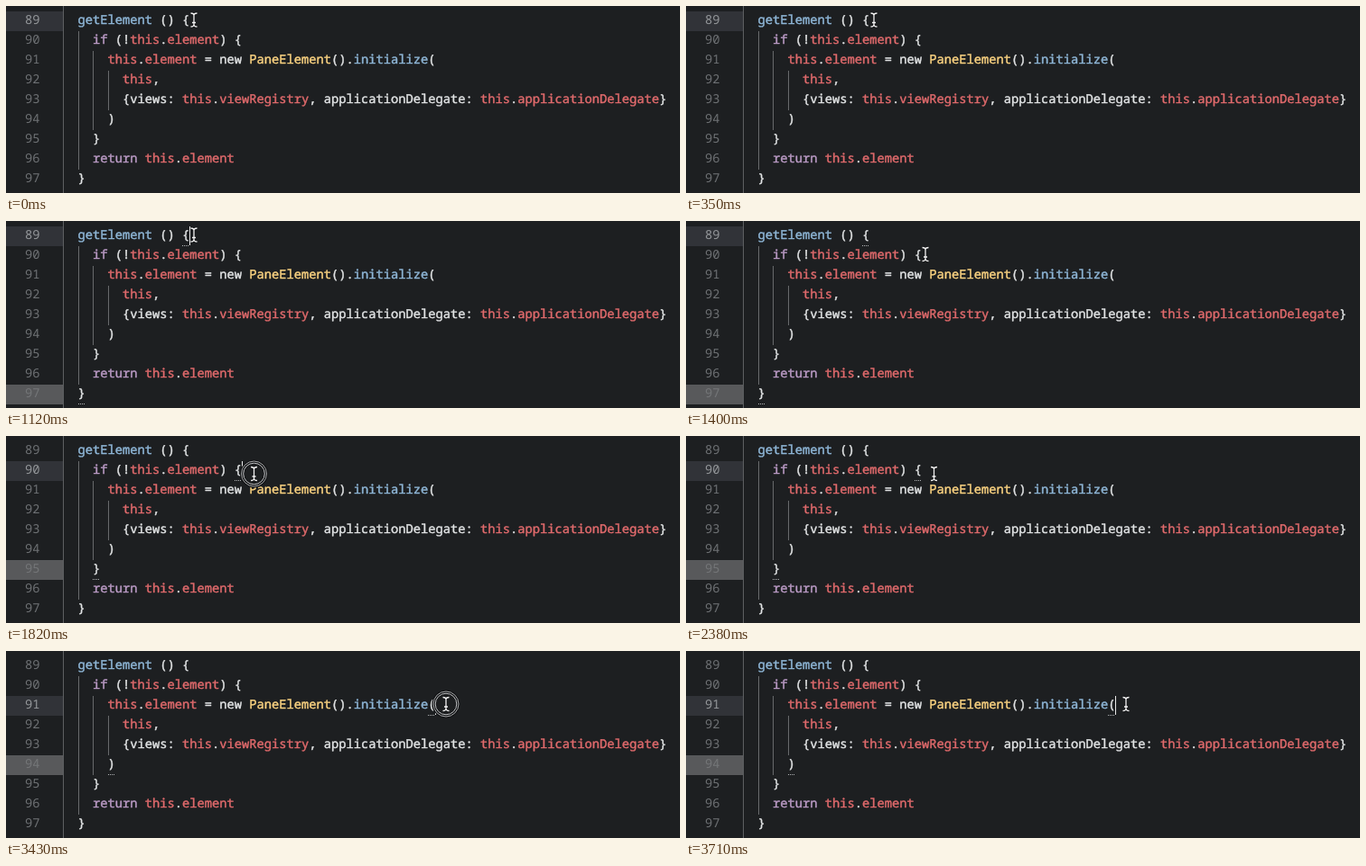
Write an HTML page with a canvas that moves like this. It is 746x208 px and loops after 3.78 s.

```html
<!DOCTYPE html>
<html lang="en">
<head>
<meta charset="utf-8">
<title>Matching brackets</title>
<style>
  html, body { margin: 0; width: 100%; height: 100%; overflow: hidden; background: #1d1f21; }
  canvas { display: block; width: 746px; height: 208px; }
</style>
</head>
<body>
<canvas id="stage" width="746" height="208"></canvas>
<script>
const ctx = document.getElementById('stage').getContext('2d');
const LOOP = 3780, STEP = 70;
const ROW = 22, TOP = 6, BASELINE = 14, LEFT = 79.5, CHAR = 8.25, GUTTER = 63;

const COLORS = {
  w: '#e2e4e5', r: '#e06a6c', b: '#8fb7d8', p: '#bb9bc6', y: '#fbd381'
};

// Each line: indent, then "color:text" tokens separated by |
const LINES = [
  [0, 'b:getElement|w: () {'],
  [2, 'p:if|w: (!|r:this|w:.|r:element|w:) {'],
  [4, 'r:this|w:.|r:element|w: = new |y:PaneElement|w:().|b:initialize|w:('],
  [6, 'r:this|w:,'],
  [6, 'w:{views: |r:this|w:.|r:viewRegistry|w:, applicationDelegate: |r:this|w:.|r:applicationDelegate|w:}'],
  [4, 'w:)'],
  [2, 'w:}'],
  [2, 'p:return|r: this|w:.|r:element'],
  [0, 'w:}']
].map(([indent, source]) => {
  let col = indent;
  return source.split('|').map(part => {
    const token = { color: COLORS[part[0]], text: part.slice(2), col };
    col += token.text.length;
    return token;
  });
});

// Indent guides: column, first row, last row
const GUIDES = [[0, 1, 7], [2, 2, 5], [4, 3, 4]];

// A click puts the caret after the opening bracket and marks its partner
const CLICKS = [
  { at: 490, row: 0, col: 14, endRow: 8, endCol: 0, caret: [[490, 1190]] },
  { at: 1750, row: 1, col: 21, endRow: 6, endCol: 2, caret: [[1750, 2310], [2870, 3430]] },
  { at: 3430, row: 2, col: 47, endRow: 5, endCol: 4, caret: [[3430, LOOP]] }
];
const RING_TIME = 140;

// Mouse path: time, x, y
const PATH = [
  [0, 208, 15.5], [1120, 208, 15.5], [1400, 265, 37], [1540, 274.5, 42],
  [2450, 274.5, 42], [2940, 479, 59], [3080, 487, 59], [LOOP, 487, 59]
];

const colX = col => LEFT + col * CHAR;
const rowY = row => TOP + row * ROW;

function rect(color, x, y, w, h) {
  ctx.fillStyle = color;
  ctx.fillRect(x, y, w, h);
}

function mouseAt(t) {
  const i = PATH.findIndex(point => point[0] > t);
  const [t0, x0, y0] = PATH[i - 1], [t1, x1, y1] = PATH[i];
  const k = (t - t0) / (t1 - t0), e = k * k * (3 - 2 * k);
  return [x0 + (x1 - x0) * e, y0 + (y1 - y0) * e];
}

function drawGutter(active, partner) {
  rect('#313338', 0, rowY(active), GUTTER, ROW);
  if (partner !== undefined) rect('#58595b', 0, rowY(partner), GUTTER, ROW);
  rect('#5e6062', GUTTER, 0, 1, 208);
  LINES.forEach((_, row) => {
    ctx.fillStyle = row === active ? '#94979a' : row === partner ? '#747678' : '#6e7174';
    ctx.fillText(89 + row, 21, rowY(row) + BASELINE);
  });
}

function drawCode() {
  for (const [col, first, last] of GUIDES) {
    rect('#686a6c', Math.round(colX(col)), rowY(first), 1, (last - first + 1) * ROW);
  }
  // A thin outline gives the code its medium weight
  ctx.lineWidth = 0.45;
  ctx.lineJoin = 'round';
  LINES.forEach((tokens, row) => {
    for (const { color, text, col } of tokens) {
      ctx.fillStyle = ctx.strokeStyle = color;
      ctx.fillText(text, colX(col), rowY(row) + BASELINE);
      ctx.strokeText(text, colX(col), rowY(row) + BASELINE);
    }
  });
}

function underline(row, col) {
  for (let x = 0; x < 8; x += 2) {
    rect('#b4b6b8', Math.round(colX(col)) + x, rowY(row) + ROW - 1, 1, 1);
  }
}

function drawRing(x, y) {
  for (const [radius, color, width] of [[13, '#131416', 5], [14, '#a4a6a8', 1], [11.8, '#c4c6c8', 1]]) {
    ctx.strokeStyle = color;
    ctx.lineWidth = width;
    ctx.beginPath();
    ctx.arc(x, y, radius, 0, Math.PI * 2);
    ctx.stroke();
  }
}

function drawMouse(x, y) {
  ctx.beginPath();
  for (const side of [-1, 1]) {
    ctx.moveTo(x + side * 3.5, y - 7.5);
    ctx.quadraticCurveTo(x, y - 7.5, x, y - 5);
    ctx.lineTo(x, y + 5);
    ctx.quadraticCurveTo(x, y + 7.5, x + side * 3.5, y + 7.5);
  }
  ctx.moveTo(x - 2, y + 3);
  ctx.lineTo(x + 2, y + 3);
  for (const [color, width] of [['#151618', 3], ['#f4f4f4', 1.3]]) {
    ctx.strokeStyle = color;
    ctx.lineWidth = width;
    ctx.stroke();
  }
}

function draw(t) {
  const click = CLICKS.filter(c => c.at <= t).pop();
  const [x, y] = mouseAt(t);
  rect('#1d1f21', 0, 0, 746, 208);
  ctx.font = '13.75px "Noto Sans Mono", "DejaVu Sans Mono", monospace';
  ctx.textRendering = 'geometricPrecision';
  drawGutter(click ? click.row : 0, click && click.endRow);
  drawCode();
  if (click) {
    underline(click.row, click.col);
    underline(click.endRow, click.endCol);
    if (click.caret.some(([on, off]) => t >= on && t < off)) {
      rect('#e8e8e8', Math.floor(colX(click.col + 1)), rowY(click.row), 1, ROW - 1);
    }
    if (t < click.at + RING_TIME) drawRing(x, y);
  }
  drawMouse(x, y);
}

function tick() {
  const t = performance.now() % LOOP;
  draw(Math.floor(t / STEP) * STEP);
  requestAnimationFrame(tick);
}
tick();
</script>
</body>
</html>
```
